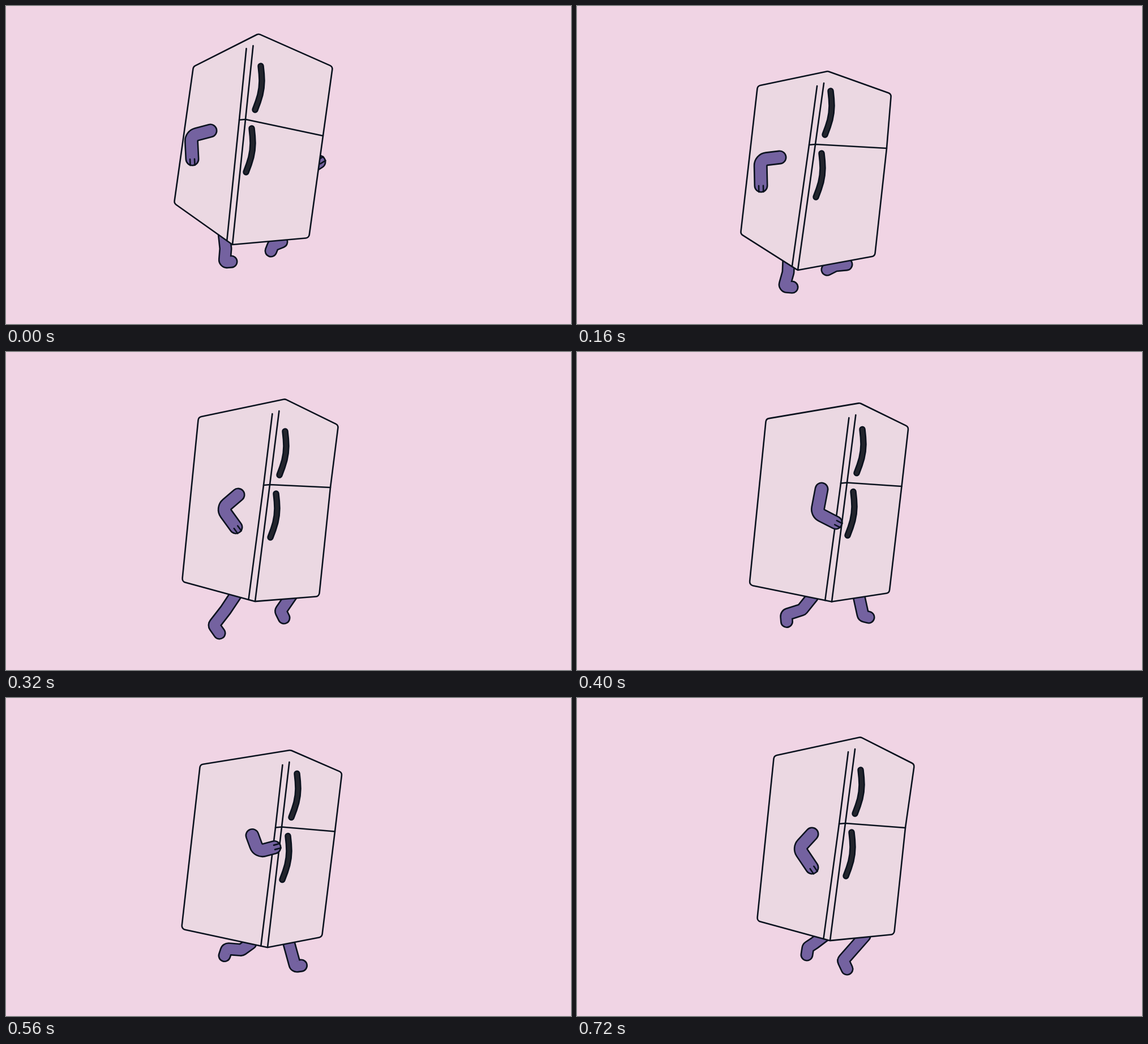
Recreate the animation shown at these times as an HTML page with a canvas. Size 998 by 561 pixels, loop 800 ms.

```html
<!DOCTYPE html>
<html lang="en">
<head>
<meta charset="utf-8">
<title>Walking fridge</title>
<style>
  html, body { margin: 0; width: 100%; height: 100%; overflow: hidden; background: #f0d4e4; }
  canvas { display: block; }
</style>
</head>
<body>
<canvas id="stage" width="998" height="561"></canvas>
<script>
const ctx = document.getElementById('stage').getContext('2d');
const INK = '#0a121e', SKIN = '#7462a0', GRIP = '#23252d';
const STEP = 80, LINE = 2.6;

const points = text => text.split(' ').map(p => p.split(',').map(Number));
const shift = ([x, y], dx, dy) => [x + dx, y + dy];
const mix = (a, b, t) => a.map((v, i) => v + (b[i] - v) * t);

// Step from a towards b, as a vector of the given length
function toward(a, b, length) {
  const dx = b[0] - a[0], dy = b[1] - a[1], k = length / Math.hypot(dx, dy);
  return [dx * k, dy * k];
}

// box: left, peak, right, seam end, right foot, base, left foot, door corner
// limbs: joints from the body outwards
function pose(box, arm, nearLeg, farLeg, farArm) {
  const parts = { box, arm, nearLeg, farLeg };
  if (farArm) parts.farArm = farArm;
  for (const key in parts) parts[key] = points(parts[key]);
  return parts;
}

function between(a, b) {
  const out = {};
  for (const key in a) out[key] = a[key].map((p, i) => mix(p, b[key][i], 0.5));
  return out;
}

const lift = pose('331,107 446,49 577,107 560,229 535,409 400,421 297,348 423,200',
  '361,220 327,229 329,270', '385,400 388,428 386,452 398,451', '487,416 472,422 468,432',
  '530,280 545,280 553,275');
const reach = pose('313,152 405,110 562,122 537,242 500,440 352,446 280,370 386,232',
  '327,237 302,219 274,258', '346,435 358,466 368,494 377,493', '447,430 447,440 453,446',
  '524,297 545,295 563,284');
const land = pose('319,141 443,115 555,155 547,251 526,441 390,466 289,402 421,244',
  '358,267 324,271 325,317', '374,445 373,470 366,495 380,496', '476,456 456,458 442,465');
const push = pose('340,115 493,83 587,129 573,239 553,431 440,440 311,405 466,234',
  '410,252 382,276 406,309', '408,425 388,455 367,482 377,496', '505,428 485,457 491,469');
const stretch = pose('328,121 506,97 584,135 574,235 550,419 460,441 298,417 488,227',
  '438,243 467,258 491,226', '424,438 407,454 372,445 364,455', '490,430 526,474 539,467');
const plant = pose('358,114 499,87 603,128 588,236 566,424 464,439 322,398 486,228',
  '432,242 424,284 457,301', '440,428 425,435 408,440 408,454', '508,430 496,473 504,477');
const roll = pose('348,102 501,69 596,117 580,229 560,417 447,428 318,393 474,221',
  '415,240 392,265 415,299', '436,420 420,432 408,440 406,453', '508,420 470,463 477,478');

const walk = [
  lift, reach, land, between(land, push), push,
  { ...between(push, stretch), arm: plant.arm },
  stretch, between(stretch, plant), plant, roll
];

function line(...pts) {
  ctx.beginPath();
  pts.forEach(p => ctx.lineTo(...p));
  ctx.stroke();
}

// Round-ended outlined stroke through joints
function tube(pts, width, color, bend) {
  ctx.beginPath();
  ctx.moveTo(...pts[0]);
  for (let i = 1; i < pts.length - 1; i++) ctx.arcTo(...pts[i], ...pts[i + 1], bend);
  ctx.lineTo(...pts[pts.length - 1]);
  for (const [w, style] of [[width, INK], [width - 2 * LINE, color]]) {
    ctx.lineWidth = w;
    ctx.strokeStyle = style;
    ctx.stroke();
  }
  ctx.lineWidth = LINE;
  ctx.strokeStyle = INK;
}

const leg = joints => tube(joints, 23, SKIN, 4);

function arm(joints) {
  const [, elbow, hand] = joints;
  tube(joints, 25, SKIN, 12);
  const [dx, dy] = toward(elbow, hand, 1);
  for (const side of [-4, 4]) {
    const root = shift(hand, -dy * side, dx * side);
    line(root, shift(root, dx * 11, dy * 11));
  }
}

const grip = top => tube([top, shift(top, 4, 39), shift(top, -10, 77)], 11.5, GRIP, 110);

function fridge(box) {
  const outline = box.slice(0, 7);
  const [, peak, , seamEnd, , base, leftFoot, corner] = box;
  ctx.beginPath();
  ctx.moveTo(...mix(leftFoot, outline[0], 0.5));
  outline.forEach((p, i) => ctx.arcTo(...p, ...outline[(i + 1) % 7], 7));
  ctx.closePath();
  ctx.fillStyle = '#ebd8e2';
  ctx.fill();
  ctx.stroke();

  // The door edge runs from the base through the corner to just below the peak
  const top = mix(base, corner, (base[1] - peak[1] - 21) / (base[1] - corner[1]));
  const hinge = shift(corner, -11, 1);
  line(top, corner, base);
  line(shift(top, -12, 5), hinge, shift(base, ...toward(base, leftFoot, 12)));
  line(hinge, corner, seamEnd);
  grip(shift(corner, 27, -94));
  grip(shift(corner, 11, 16));
}

function draw(now) {
  const p = walk[Math.floor(now / STEP) % walk.length];
  ctx.fillStyle = '#f0d4e4';
  ctx.fillRect(0, 0, 998, 561);
  ctx.strokeStyle = INK;
  ctx.lineWidth = LINE;
  ctx.lineCap = ctx.lineJoin = 'round';
  leg(p.farLeg);
  leg(p.nearLeg);
  if (p.farArm) arm(p.farArm);
  fridge(p.box);
  arm(p.arm);
}

const start = performance.now();
function tick() {
  draw(performance.now() - start);
  requestAnimationFrame(tick);
}
tick();
</script>
</body>
</html>
```
